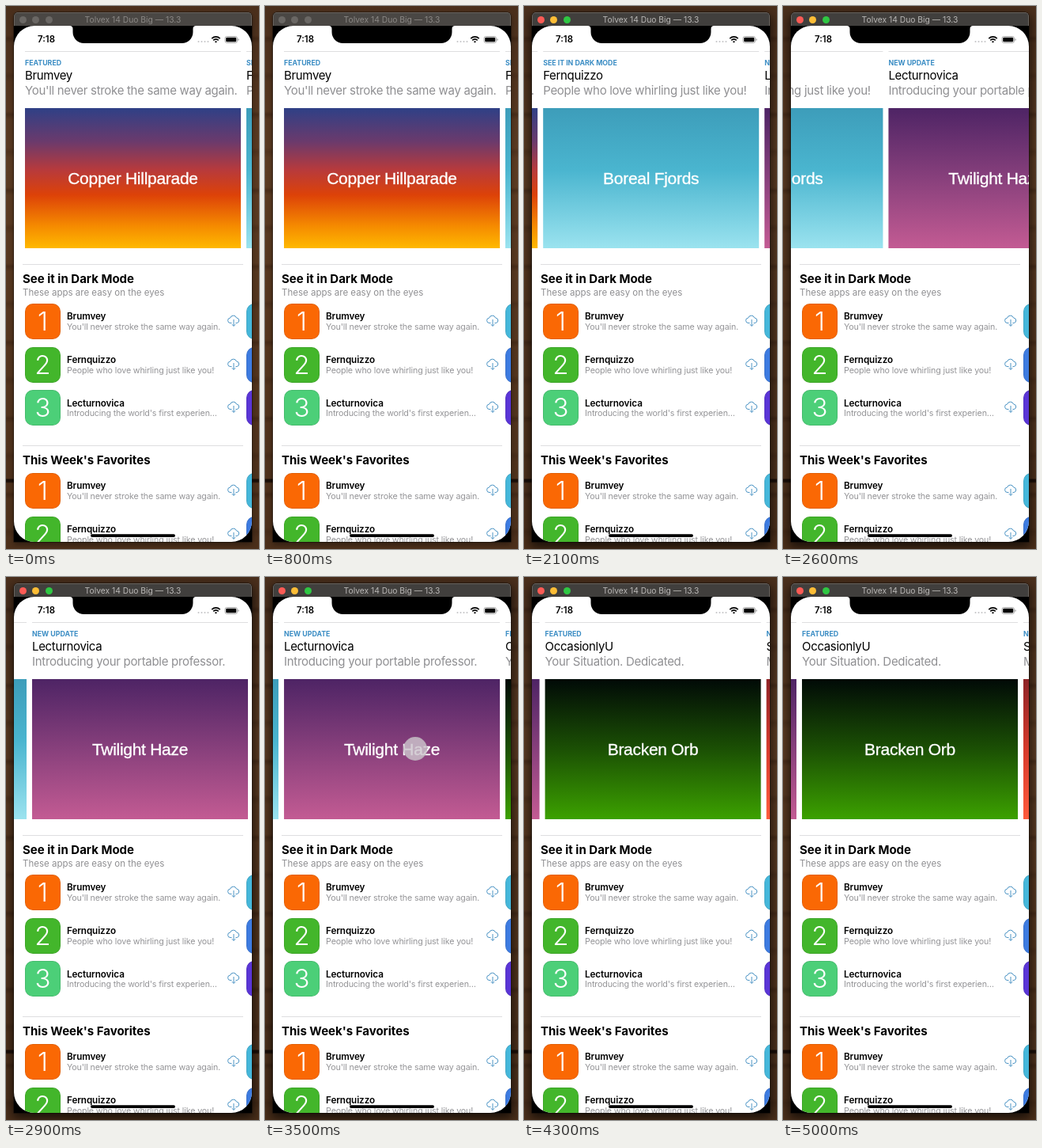
Recreate the animation shown at these times as an HTML page. Size 320x686 px, loop 5100 ms.

```html
<!DOCTYPE html>
<html lang="en">
<head>
<meta charset="utf-8">
<title>App carousel</title>
<style>
html, body { margin: 0; width: 100%; height: 100%; overflow: hidden; }
body { font-family: Inter, sans-serif; }
#stage {
  position: relative; width: 320px; height: 686px; overflow: hidden;
  background:
    linear-gradient(transparent 597px, #1b0f08 598px, #1b0f08 601px, transparent 603px),
    repeating-linear-gradient(180deg, #0000 0 37px, #2a160a55 41px, #0000 47px 83px, #2a160a33 88px, #0000 96px),
    linear-gradient(#4a2f1c, #5c3c23 30%, #53351e 65%, #4c301b);
}
#stage *, #stage { box-sizing: border-box; }
#stage div, #stage svg { position: absolute; }
#phone {
  left: 10px; top: 8px; width: 301px; height: 669px; background: #000;
  border-radius: 5px 5px 0 0; box-shadow: 0 0 0 .5px #000a, 0 3px 7px #0006;
}
.active #phone { box-shadow: 0 0 0 .5px #000a, 0 5px 14px 2px #000a; }
#bar {
  left: 0; top: 0; width: 301px; height: 17px; border-radius: 5px 5px 0 0;
  background: #4a4744; color: #8b8885; border: 1px solid #68635e; border-bottom: 0;
}
.active #bar { background: #413f3d; color: #bab8b6; }
#bar i { position: absolute; top: 3.5px; width: 9px; height: 9px; border-radius: 50%; background: #6a6764; }
.active #bar i { background: var(--c); }
#screen { left: 0; top: 17px; width: 301px; height: 652px; border-radius: 26px; background: #fff; overflow: hidden; }
/* inside the screen, coordinates are those of the stage */
#view { left: -10px; top: -25px; width: 320px; height: 686px; }
#track { left: 0; top: 0; }
.t { white-space: pre; line-height: 20px; height: 20px; }
.label { font-size: 8.8px; font-weight: 700; color: #3b8dc4; }
.name { font-size: 15px; letter-spacing: -.33px; color: #000; }
.tag { font-size: 15px; letter-spacing: -.3px; color: #8f8f92; }
.head { font-size: 15px; font-weight: 700; color: #000; }
.sub { font-size: 11.5px; color: #8f8f92; }
.app { font-size: 11.7px; font-weight: 600; letter-spacing: -.1px; color: #000; }
.note { font-size: 10.7px; letter-spacing: -.14px; color: #949497; }
.line { height: 1px; background: #dedee0; }
.art {
  top: 129px; width: 273px; height: 177px; color: #fff; text-align: center;
  font: 21px/178px "Liberation Sans", Arial, sans-serif; letter-spacing: -.28px;
  -webkit-text-stroke: .35px #fff;
}
.icon {
  width: 45px; height: 45px; border-radius: 10px; color: #fff; text-align: center;
  font: 300 33px/45px Inter, sans-serif; box-shadow: inset 0 0 0 .7px #0002;
}
#dot {
  width: 30px; height: 30px; margin: -15px; top: 217px; border-radius: 50%;
  background: #cdc6cdd0; border: 1px solid #b5adb5a0;
}
</style>
</head>
<body>
<div id="stage">
  <div id="phone">
    <div id="bar">
      <i style="left:5.5px;--c:#fc5b55"></i><i style="left:22px;--c:#fdbd36"></i><i style="left:38.5px;--c:#2fc743"></i>
      <div class="t" style="left:0;width:299px;top:-2px;text-align:center;font-size:10.3px">Tolvex 14 Duo Big — 13.3</div>
    </div>
    <div id="screen"><div id="view">
      <div id="track"></div>
      <div id="list"></div>
      <div id="dot"></div>
      <svg width="320" height="686" style="left:0;top:0">
        <path d="M80.5 25a4 4 0 0 1 4 4v4a14 14 0 0 0 14 14h124a14 14 0 0 0 14-14v-4a4 4 0 0 1 4-4z"/>
        <g fill="#c4c4c6">
          <circle cx="243.5" cy="45" r="1"/><circle cx="247.5" cy="45" r="1"/>
          <circle cx="251.5" cy="45" r="1"/><circle cx="255.5" cy="45" r="1"/>
        </g>
        <g fill="none" stroke="#000" stroke-width="1.7">
          <path d="M260.3 41.1a7.3 7.3 0 0 1 10.4 0M262.3 43.3a4.4 4.4 0 0 1 6.4 0"/>
        </g>
        <path d="M263.9 44.9a2.3 2.3 0 0 1 3.2 0l-1.6 1.7z"/>
        <rect x="277" y="38.5" width="15.5" height="8" rx="2.3" fill="none" stroke="#999" stroke-width=".8"/>
        <rect x="278.2" y="39.7" width="13.1" height="5.6" rx="1.3"/>
        <path d="M293.5 41v3q1.2-.4 1.2-1.5t-1.2-1.5" fill="#999"/>
        <rect x="107" y="667.2" width="107" height="3.7" rx="1.85"/>
      </svg>
      <div class="t" style="left:40px;top:32px;font-size:11.4px;font-weight:600">7:18</div>
    </div></div>
  </div>
</div>
<script>
const LOOP = 5100, STEP = 100, PITCH = 280, ACTIVATE = 900;
const PRESSES = [1000, 2256, 3510];
const $ = id => document.getElementById(id);

const cards = [
  ["FEATURED", "Brumvey", "You'll never stroke the same way again.", "Copper Hillparade",
    "#2f4086, #6b3a6c 24%, #b73a3c 44%, #dd4208 62%, #f58a00 84%, #ffb900"],
  ["SEE IT IN DARK MODE", "Fernquizzo", "People who love whirling just like you!", "Boreal Fjords",
    "#3d9dba, #4ab5cf 44%, #9be3ef"],
  ["NEW UPDATE", "Lecturnovica", "Introducing your portable professor.", "Twilight Haze",
    "#4e2465, #88407c 50%, #c35b93"],
  ["FEATURED", "OccasionlyU", "Your Situation. Dedicated.", "Bracken Orb",
    "#010a07, #1b5004 50%, #3ca100"],
  ["NEW UPDATE", "Sorvelin", "Make every moment count.", "",
    "#8e2326, #d63a2c 50%, #ff5a3c"]
];
const apps = [
  ["Brumvey", "You'll never stroke the same way again.", "#fa6804", "#45b7da"],
  ["Fernquizzo", "People who love whirling just like you!", "#43b62b", "#3d7be0"],
  ["Lecturnovica", "Introducing the world's first experien…", "#4ccf78", "#5a35d6"]
];

const text = (cls, x, mid, str) =>
  `<div class="t ${cls}" style="left:${x}px;top:${mid - 10}px">${str}</div>`;
const line = (x, y, w) => `<div class="line" style="left:${x}px;top:${y}px;width:${w}px"></div>`;
const icon = (x, y, color, str) =>
  `<div class="icon" style="left:${x}px;top:${y}px;background:${color}">${str}</div>`;
const cloud = y => `<svg width="16" height="16" style="left:280px;top:${y}px" fill="none" stroke="#4b93c4">
  <path d="M5.5 10.5H4a3.2 3.2 0 0 1-.4-6.4A4.2 4.2 0 0 1 11.6 4a3.3 3.3 0 0 1 .6 6.5h-1.7M8 6v8.3M5.8 12.2 8 14.4l2.2-2.2"/></svg>`;

const card = ([label, name, tag, title, stops], i) => {
  const x = 24 + i * PITCH;
  return line(x, 57, 273) + text("label", x, 72, label) + text("name", x, 88, name) +
    text("tag", x, 107, tag) +
    `<div class="art" style="left:${x}px;background:linear-gradient(${stops})">${title}</div>`;
};
const rows = (top, count) => apps.slice(0, count).map(([name, note, color, next], i) => {
  const y = top + i * 54.6;
  return icon(24, y, color, i + 1) + text("app", 77, y + 16.3, name) +
    text("note", 77, y + 30, note) + cloud(y + 14) + icon(304, y, next, "");
}).join("");

$("track").innerHTML = cards.map(card).join("");
$("list").innerHTML =
  line(21, 326, 279) + text("head", 21, 344.5, "See it in Dark Mode") +
  text("sub", 21, 361.5, "These apps are easy on the eyes") + rows(376, 3) +
  line(21, 555, 279) + text("head", 21, 573.5, "This Week's Favorites") + rows(590, 2);

// Finger drag, then an exponential settle onto the next page
function swipe(ms) {
  if (ms <= 0) return 0;
  const u = Math.min(ms, 400) / 600, drag = u * u * (3 - 2 * u);
  return ms <= 400 ? drag : 1 - (1 - drag) * Math.exp((400 - ms) / 117);
}

function draw(now) {
  const t = Math.floor(now % LOOP / STEP) * STEP;
  const offset = PRESSES.reduce((sum, p) => sum + swipe(t - p), 0) * PITCH;
  $("track").style.transform = `translateX(${-offset.toFixed(2)}px)`;
  const press = PRESSES.find(p => t >= p - 50 && t <= p + 200);
  $("dot").style.display = press ? "block" : "none";
  if (press) $("dot").style.left = 190 - swipe(t - press) * PITCH + "px";
  $("stage").className = t >= ACTIVATE ? "active" : "";
}

const start = performance.now();
(function tick() {
  draw(performance.now() - start);
  requestAnimationFrame(tick);
})();
</script>
</body>
</html>
```
